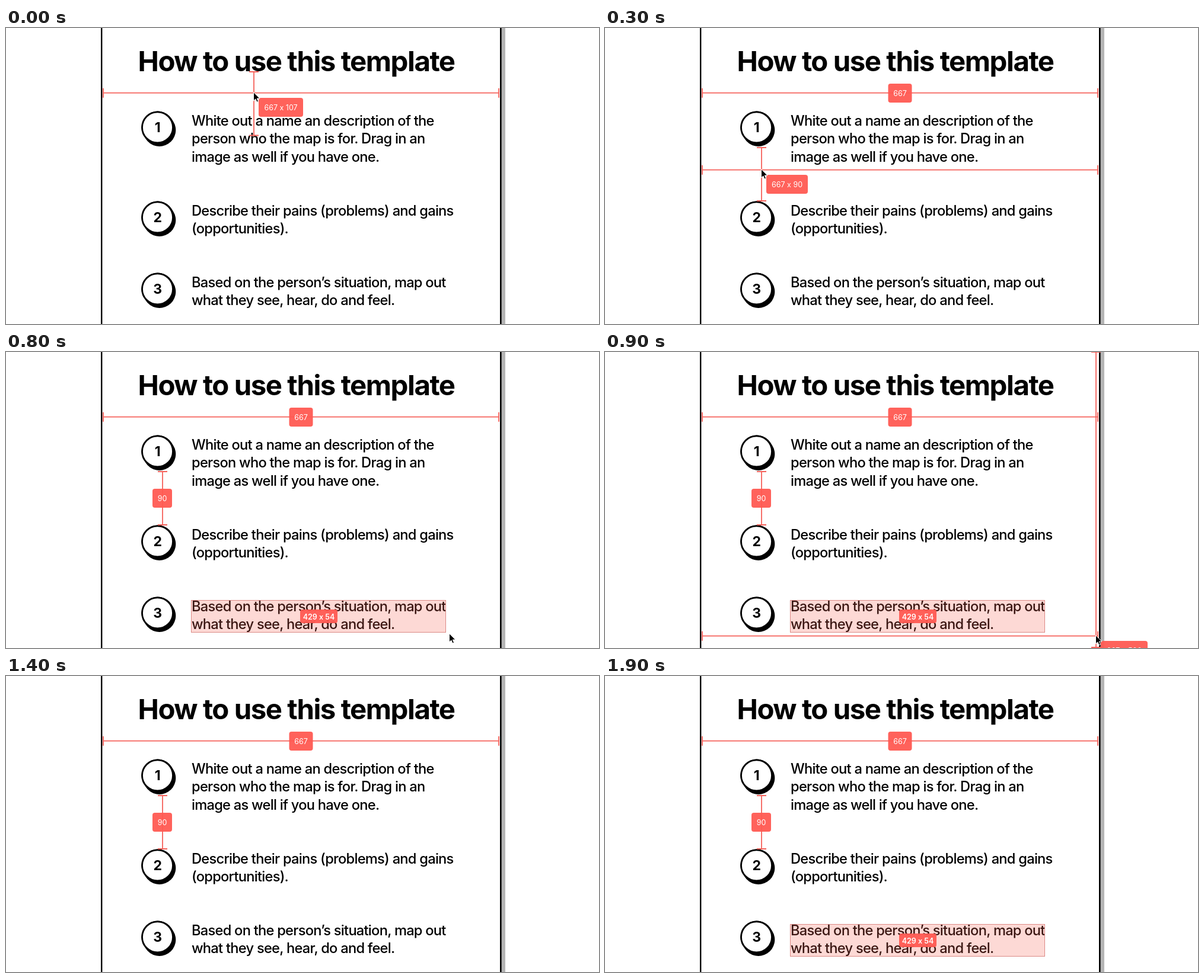
Recreate the animation shown at these times as an HTML page. Size 1000x500 px, loop 2000 ms.

```html
<!DOCTYPE html>
<html lang="en">
<head>
<meta charset="utf-8">
<title>How to use this template</title>
<style>
html, body { margin: 0; width: 100%; height: 100%; overflow: hidden; background: #fff; }
svg { display: block; width: 1000px; height: 500px; }
text { font-family: Inter, "Liberation Sans", sans-serif; font-optical-sizing: none; }
.title { font-size: 47.3px; font-weight: 700; letter-spacing: -.03em; }
.body { font-size: 23.65px; font-weight: 500; letter-spacing: -.031em; }
.num { font-size: 23px; font-weight: 700; text-anchor: middle; }
.badge rect { fill: #ff5a53; fill-opacity: .95; }
.badge text { font-size: 12.5px; fill: #fff; text-anchor: middle; font-feature-settings: "calt" 0; }
.badge.strong text { font-weight: 600; }
.rule { fill: none; stroke: #f5625b; stroke-width: 1.8; }
.area { fill: #f5624f; fill-opacity: .24; stroke: #dc8a86; }
</style>
</head>
<body>
<svg viewBox="0 0 1000 500">
  <rect x="835" width="7" height="500" fill="#b5b5b5"/>
  <rect x="160" width="2.4" height="500"/>
  <rect x="833" width="2.6" height="500"/>
  <text class="title" x="222.5" y="73.4">How to use this template</text>
  <g id="steps"></g>
  <g id="pins"></g>
  <g id="live"></g>
</svg>
<script>
const byId = id => document.getElementById(id);

const steps = [
  [167.9, 164.6, "White out a name an description of the",
    "person who the map is for. Drag in an", "image as well if you have one."],
  [319.9, 316.5, "Describe their pains (problems) and gains", "(opportunities)."],
  [440.9, 437.6, "Based on the person’s situation, map out", "what they see, hear, do and feel."]
];

byId("steps").innerHTML = steps.map(([cy, base, ...lines], i) => `
  <path d="M256 ${cy + .1}L258.8 ${cy + 4.5}" stroke="#000" stroke-width="55" stroke-linecap="round"/>
  <circle cx="255.5" cy="${cy}" r="26" fill="#fff" stroke="#000" stroke-width="2.8"/>
  <text class="num" x="255.7" y="${cy + 8.3}">${i + 1}</text>` +
  lines.map((s, n) => `<text class="body" x="313" y="${base + n * 30.75}">${s}</text>`).join("")
).join("");

const badge = (x, y, w, label, h = 32, cls = "") => `<g class="badge ${cls}">
  <rect x="${x}" y="${y}" width="${w}" height="${h}" rx="4"/>
  <text x="${x + w / 2}" y="${y + h / 2 + 5}">${label}</text></g>`;

const across = (y, l, r, tick = 8) =>
  `<path class="rule" d="M${l} ${y}H${r}M${l} ${y - tick}v${2 * tick}M${r} ${y - tick}v${2 * tick}"/>`;

const down = (x, t, b, tick = 8) =>
  `<path class="rule" d="M${x} ${t}V${b}M${x - tick} ${t}h${2 * tick}M${x - tick} ${b}h${2 * tick}"/>`;

const arrow = (x, y) => `<path transform="translate(${x - .5} ${y - 1.5})" stroke="#fff"
  d="M0 0V14.5L3.3 11.4L5.6 16.6L8 15.6L5.8 10.5H10.4Z"/>`;

const hover = (x, y, l, r, t, b, label, w) =>
  across(y - .3, l, r) + down(x, t, b) + badge(x + 8, y + 8, w, label) + arrow(x, y);

const area = (x, y, w, h) =>
  `<rect class="area" x="${x + .5}" y="${y + .5}" width="${w}" height="${h}"/>`;

const drag = (x, y, w, h) => area(x, y, w, h) +
  badge(x + w + 8, y + h - 36, 66, `${w} x ${h}`) + arrow(x + w, y + h);

const picked = area(312, 419, 429, 54) + badge(496, 435, 63, "429 x 54", 23, "strong");
const near = across(430, 326, 337, 4) + down(331, 427, 432, 4) +
  badge(339, 440, 46, "4 x 2") + arrow(329, 428);
const gap = hover(264, 240, 164, 831, 202, 292, "667 x 90", 70);

// [start in ms, pinned measures, live drawing]
const scenes = [
  [0, 0, hover(418, 110, 164, 831, 74, 181.5, "667 x 107", 75)],
  [100, 1, arrow(418, 110)],
  [200, 1, gap],
  [400, 2, arrow(264, 240)],
  [500, 2, hover(320, 385, 164, 831, 350, 421, "667 x 71", 68)],
  [600, 2, near],
  [700, 2, drag(306, 413, 210, 36)],
  [800, 2, picked + arrow(748, 477)],
  [900, 2, picked + hover(828, 480, 164, 831, 0, 499, "667 x 500", 79)],
  [1000, 2, picked],
  [1200, 2, ""],
  [1900, 2, picked]
];

const pins = [
  across(109.7, 164, 831) + badge(477.5, 94, 40, "667"),
  down(264, 202, 292) + badge(247, 231, 33, "90")
];

let shown;
function tick(now) {
  const t = now % 2000;
  const scene = scenes.findLast(s => s[0] <= t);
  if (scene !== shown) {
    shown = scene;
    byId("pins").innerHTML = pins.slice(0, scene[1]).join("");
    byId("live").innerHTML = scene[2];
  }
  requestAnimationFrame(() => tick(performance.now() - start));
}
const start = performance.now();
tick(0);
</script>
</body>
</html>
```
